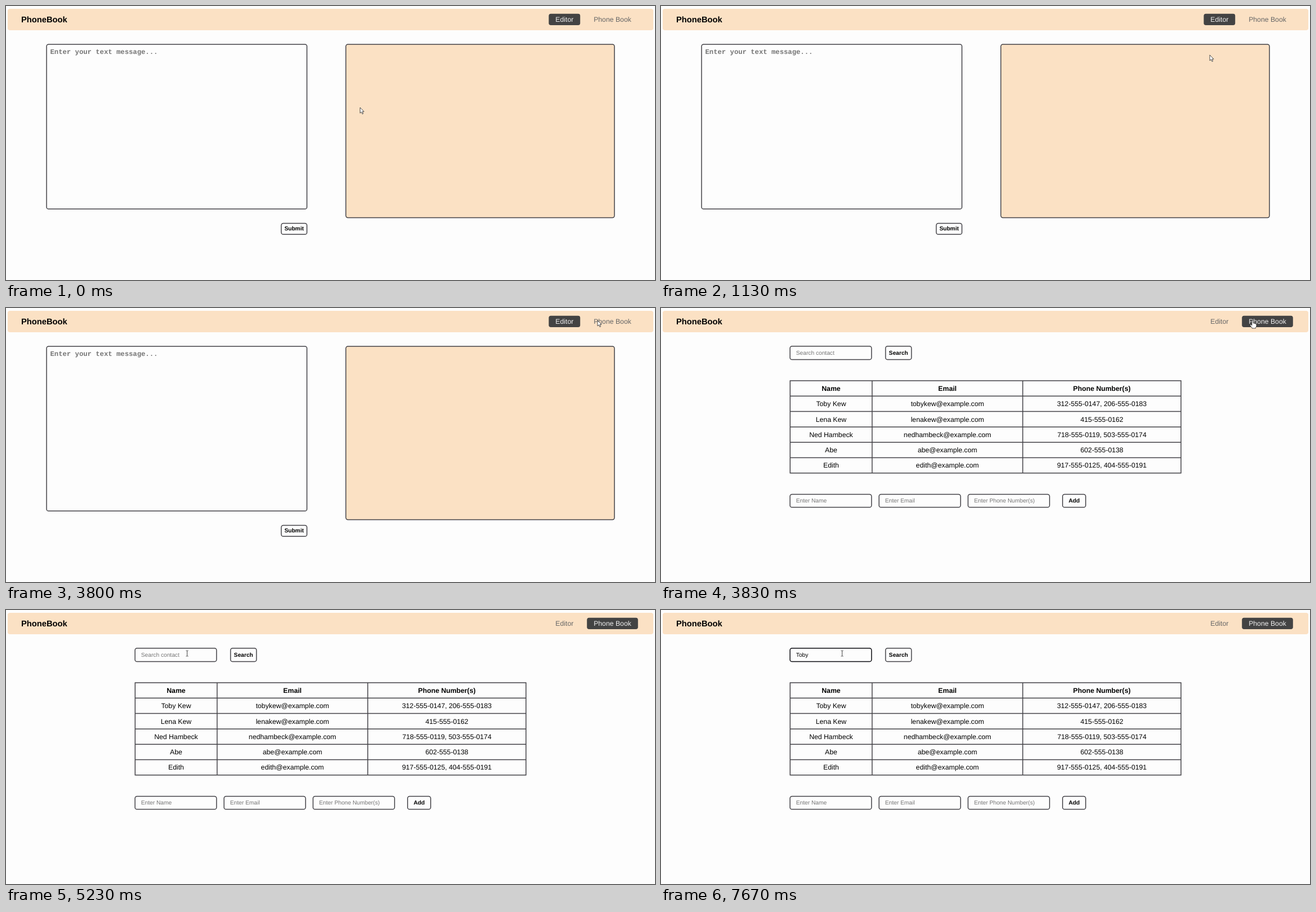
Animation, 1152 px wide and 486 px high, one loop 8000 ms. Source, as an HTML page:

```html
<!DOCTYPE html>
<html lang="en">
<head>
<meta charset="utf-8">
<title>PhoneBook</title>
<style>
  html, body { margin: 0; width: 100%; height: 100%; overflow: hidden; background: #fdfdfd; }
  svg { display: block; width: 100%; height: 100%; }
  text { font: 12.24px "Liberation Sans", Arial, sans-serif; text-rendering: geometricPrecision; }
  .small { font-size: 10.2px; }
  .bold { font-weight: bold; }
  .mid { text-anchor: middle; }
  .hint { fill: #757575; }
  .mono { font: bold 12.24px "Liberation Mono", "Courier New", monospace; }
  .title { font-size: 14.69px; font-weight: bold; }
  .line { fill: none; stroke: #434247; stroke-width: 1.5; }
</style>
</head>
<body>
<svg id="stage" viewBox="0 0 1152 486"></svg>
<script>
const LOOP = 8000;
const PEACH = "#fbe1c4", DARK = "#434343";
const stage = document.getElementById("stage");

function add(parent, tag, attrs, content) {
  const el = document.createElementNS("http://www.w3.org/2000/svg", tag);
  for (const key in attrs) el.setAttribute(key, attrs[key]);
  if (content) el.textContent = content;
  parent.append(el);
  return el;
}
const text = (parent, x, y, content, cls) => add(parent, "text", { x, y, class: cls || "" }, content);
const box = (parent, x1, y1, x2, y2, fill = "none") =>
  add(parent, "rect", { x: x1, y: y1, width: x2 - x1, height: y2 - y1, rx: 3.6, class: "line", style: `fill:${fill}` });

function button(parent, x1, y1, x2, y2, label, baseline) {
  box(parent, x1, y1, x2, y2);
  text(parent, (x1 + x2) / 2, baseline, label, "small bold mid");
}
function field(parent, x, y1, y2, hint, baseline) {
  return { frame: box(parent, x, y1, x + 144.7, y2), label: text(parent, x + 10.8, baseline, hint, "small hint") };
}

// Navigation bar
add(stage, "rect", { x: 3, y: 5, width: 1146, height: 38, rx: 4, fill: PEACH });
text(stage, 27, 29, "PhoneBook", "title");
function tab(x1, x2, label) {
  const pill = add(stage, "rect", { x: x1, y: 13.8, width: x2 - x1, height: 20.2, rx: 3.8, fill: DARK });
  const name = text(stage, (x1 + x2) / 2, 28, label, "mid");
  return level => {
    const gray = Math.round(102 + 136 * level);
    pill.setAttribute("opacity", level);
    name.setAttribute("fill", `rgb(${gray},${gray},${gray})`);
  };
}
const editorTab = tab(963.4, 1019.2, "Editor");
const bookTab = tab(1031.2, 1121.8, "Phone Book");

// Editor page
const editor = add(stage, "g", {});
box(editor, 72, 68, 534.2, 360);
text(editor, 78.5, 85, "Enter your text message...", "mono hint");
button(editor, 488.6, 385.6, 534.2, 405, "Submit", 398.2);
box(editor, 603.3, 68, 1080, 375.4, PEACH);

// Phone book page
const book = add(stage, "g", {});
const search = field(book, 229, 67.8, 91.6, "Search contact", 82.5);
button(book, 398.6, 67.8, 444.6, 91.6, "Search", 82.5);

const ROW = 27.3, TOP = 129, COLS = [229.2, 374.7, 642.2, 923];
const rows = [
  ["Name", "Email", "Phone Number(s)"],
  ["Toby Kew", "tobykew@example.com", "312-555-0147, 206-555-0183"],
  ["Lena Kew", "lenakew@example.com", "415-555-0162"],
  ["Ned Hambeck", "nedhambeck@example.com", "718-555-0119, 503-555-0174"],
  ["Abe", "abe@example.com", "602-555-0138"],
  ["Edith", "edith@example.com", "917-555-0125, 404-555-0191"]
];
const bottom = TOP + ROW * rows.length;
rows.forEach((row, i) => row.forEach((cell, j) =>
  text(book, (COLS[j] + COLS[j + 1]) / 2, TOP + ROW * i + 17.9, cell, i ? "mid" : "mid bold")));
let grid = COLS.map(x => `M${x},${TOP - .75}V${bottom + .75}`).join("");
for (let i = 0; i <= rows.length; i++) grid += `M${COLS[0]},${TOP + ROW * i}H${COLS[3]}`;
add(book, "path", { d: grid, class: "line" });

["Enter Name", "Enter Email", "Enter Phone Number(s)"].forEach((hint, i) =>
  field(book, 229 + 158 * i, 330.5, 353.6, hint, 345));
button(book, 712.8, 330.5, 753.8, 353.6, "Add", 345);
const caret = add(book, "rect", { y: 73.3, width: 1, height: 11.5 });

// Mouse pointers, each drawn around its hot spot
const shape = (d, attrs) => add(stage, "path", { d, ...attrs });
const outlined = { fill: "#fff", stroke: "#222", "stroke-width": .8, "stroke-linejoin": "round" };
const pointers = {
  arrow: shape("M0,0V10L2.3,7.9L4,11.6L5.6,10.9L4,7.3H7Z", outlined),
  hand: shape("M-1.2,.6Q0,-1 1.2,.6V5Q2.6,4.2 3.4,5.4Q5,4.9 5.4,6.2Q7,6 7,7.5V10Q6.8,11.5 5.5,12.8V14H-1V13Q-3,11 -4.5,8.2Q-4.6,6.6 -3,7.2L-1.2,9Z", outlined),
  beam: shape("M-2,-5H-.6L0,-4.5L.6,-5H2M0,-4.5V4.5M-2,5H-.6L0,4.5L.6,5H2", { fill: "none", stroke: "#333", "stroke-width": .9 })
};

const clamp = v => Math.max(0, Math.min(1, v));
const span = (t, a, b) => clamp((t - a) / (b - a));
const inside = (p, x1, y1, x2, y2) => p.x >= x1 && p.x <= x2 && p.y >= y1 && p.y <= y2;

const approach = [[30, 628.5, 180], [1130, 974, 87], [1670, 1021, 30], [1850, 1050, 22]];
function pointerAt(t) {
  if (t >= 4600) {
    const p = (1 - Math.cos(Math.PI * span(t, 4600, 5220))) / 2, q = 1 - p;
    const bend = (a, b, c) => q * q * a + 2 * q * p * b + p * p * c;
    return { x: bend(1050, 800, 321.5), y: bend(22, 120, 77) };
  }
  let i = 0;
  while (i < approach.length - 2 && t > approach[i + 1][0]) i++;
  const [t0, x0, y0] = approach[i], [t1, x1, y1] = approach[i + 1];
  const k = span(t, t0, t1);
  return { x: x0 + (x1 - x0) * k, y: y0 + (y1 - y0) * k };
}

const WORD = "Toby", KEYS = [6370, 6700, 7000, 7170];
const FOCUS = 5500, RELOAD = 3730, OPEN = 3830;

function draw(t) {
  const onBook = t >= OPEN, loading = t >= RELOAD && t < OPEN;
  editor.style.display = onBook ? "none" : "";
  book.style.display = onBook ? "" : "none";
  editorTab(onBook ? 0 : 1);
  bookTab(onBook ? 1 : loading ? 0 : span(t, 1710, 2000));

  const focused = t >= FOCUS;
  const typed = KEYS.filter(k => t >= k).length;
  search.frame.style.stroke = focused ? "#0b0b10" : "";
  search.label.textContent = typed ? WORD.slice(0, typed) : "Search contact";
  search.label.style.fill = typed ? "#000" : "";
  const since = t - (typed ? KEYS[typed - 1] : FOCUS);
  const lit = focused && since % 1000 < 500;
  caret.style.display = lit ? "" : "none";
  if (lit) caret.setAttribute("x", 239.8 + (typed ? search.label.getComputedTextLength() : 0));

  const p = pointerAt(t);
  let kind = "arrow";
  if (!loading && inside(p, 1031, 14, 1122, 34)) kind = "hand";
  else if (onBook && inside(p, 229, 67, 374, 92)) kind = "beam";
  for (const name in pointers) pointers[name].style.display = name === kind ? "" : "none";
  pointers[kind].setAttribute("transform", `translate(${p.x.toFixed(2)} ${p.y.toFixed(2)})`);
}

const start = performance.now();
function tick() {
  draw((performance.now() - start) % LOOP);
  requestAnimationFrame(tick);
}
tick();
</script>
</body>
</html>
```
